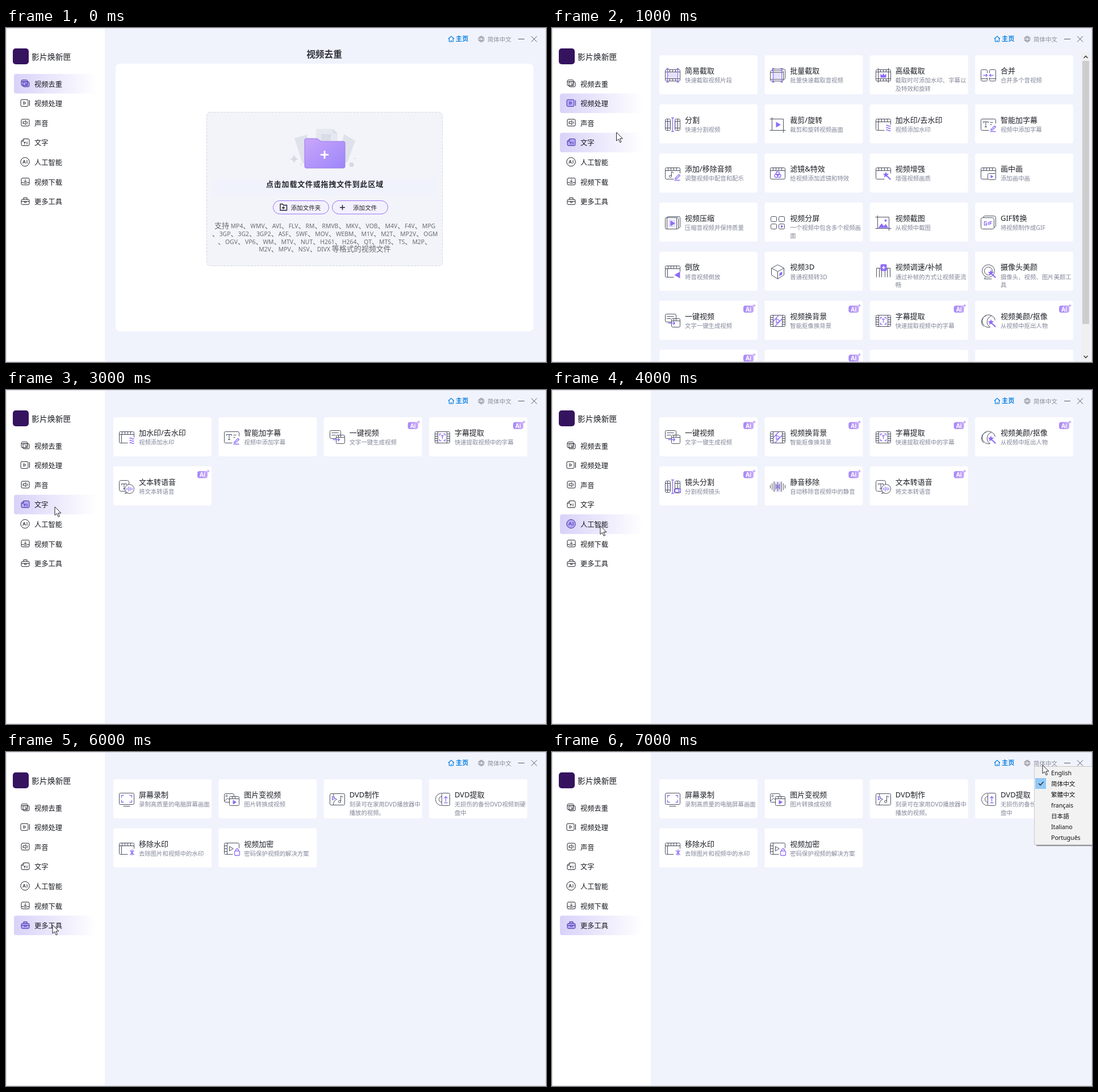
Write an HTML page that moves like this. It is 951 by 589 pixels and loops after 8 s.

```html
<!DOCTYPE html>
<html lang="zh-CN">
<head>
<meta charset="utf-8">
<style>
  html, body { margin: 0; width: 100%; height: 100%; overflow: hidden; background: #f0f3fc; }
  svg { display: block; width: 951px; height: 589px; font-family: 'Noto Sans', 'Noto Sans CJK SC', 'Noto Sans CJK', sans-serif; }
  .line, .sheet, .accent, .light { fill: none; stroke: #4b5060; stroke-linejoin: round; }
  .sheet { fill: #fff; }
  .accent { stroke: #8d6bf8; stroke-width: 1.3; }
  .light { stroke: #fff; stroke-width: 1.4; }
  .solid { fill: #8d6bf8; }
  .pale { fill: #e6e0fd; }
</style>
</head>
<body>
<svg id="stage" viewBox="0 0 951 589"></svg>
<script>
const PAGE_MS = 1000;

// Path helpers
const box = (x, y, w, h) => `M${x} ${y}h${w}v${h}h${-w}z`;
const round = (x, y, w, h, r = 2) =>
  `M${x + r} ${y}h${w - 2 * r}q${r} 0 ${r} ${r}v${h - 2 * r}q0 ${r} ${-r} ${r}h${2 * r - w}q${-r} 0 ${-r} ${-r}v${2 * r - h}q0 ${-r} ${r} ${-r}z`;
const ring = (x, y, r) => `M${x - r} ${y}a${r} ${r} 0 1 0 ${2 * r} 0a${r} ${r} 0 1 0 ${-2 * r} 0z`;
const play = (x, y, s) => `M${x} ${y - s}l${1.7 * s} ${s}l${-1.7 * s} ${s}z`;
const ticks = (list, draw) => list.map(draw).join('');
const star = (x, y, r) => 'M' + Array.from({ length: 10 }, (_, i) => {
  const angle = Math.PI * (i / 5 - 0.5), reach = i % 2 ? r * 0.45 : r;
  return `${(x + reach * Math.cos(angle)).toFixed(1)} ${(y + reach * Math.sin(angle)).toFixed(1)}`;
}).join('L') + 'z';

// Shared icon parts in a 28 x 28 box
const film = round(1, 4, 26, 20) + 'M1 8h26M1 20h26' + ticks([5, 9, 14, 19, 23], x => `M${x} 4v4M${x} 20v4`);
const sideFilm = round(1, 4, 26, 20) + 'M6 4v20M22 4v20' + ticks([8, 12, 16, 20], y => `M1 ${y}h5M22 ${y}h5`);
const strip = 'M1 9h26' + ticks([6, 11, 16, 21], x => `M${x} 4v5`);
const openFilm = 'M27 14V6q0-2-2-2H3q-2 0-2 2v16q0 2 2 2h13' + strip;
const closedFilm = round(1, 4, 26, 20) + strip;
const halves = round(1, 4, 9, 20) + round(18, 4, 9, 20) + 'M1 8h9M1 20h9M18 8h9M18 20h9M5 4v20M23 4v20';
const cropMarks = 'M4 1v23H0M0 4h24v24M28 24H4';
const divider = 'M14 2v24M11.5 2h5M11.5 26h5';
const pencil = 'M17 26h10M18 23l7-7 2 2-7 6z';
const wand = star(18.5, 16.5, 5.5) + 'M20.5 20l1.5-1.5 5.5 5.5-1.5 1.5z';
const letterT = 'M5 11v-2h9v2M9.5 9v9M7.5 18h4';

const icons = {
  crop: { pale: box(6, 8, 16, 12), line: film, accent: 'M5 2v24M23 2v24M3 2h4M21 2h4M3 26h4M21 26h4' },
  batch: { line: round(4, 3, 23, 18), sheet: round(1, 6, 23, 18) + 'M1 9h23M1 21h23', pale: box(6, 10, 13, 10), accent: 'M6 2v24M21 2v24M4 2h4M19 2h4M4 26h4M19 26h4' },
  crown: { line: film + 'M5 1v26M23 1v26', solid: 'M9 18v-7l3 3 2-4 2 4 3-3v7z' },
  merge: { line: 'M12 10V6q0-2-2-2H3q-2 0-2 2v16q0 2 2 2h7q2 0 2-2v-4M16 10V6q0-2 2-2h7q2 0 2 2v16q0 2-2 2h-7q-2 0-2-2v-4M1 20h11M16 20h11', accent: 'M5 14h7M9.5 11.5l2.5 2.5-2.5 2.5M23 14h-7M18.5 11.5l-2.5 2.5 2.5 2.5' },
  split: { pale: box(5, 8, 5, 12) + box(18, 8, 5, 12), line: halves, accent: divider },
  rotate: { line: cropMarks, solid: play(11, 14, 5) },
  watermark: { line: openFilm + 'M5 9v15', accent: ticks([16, 20, 24], y => `M19 ${y}q2-2 4 0t4 0`) },
  subtitle: { line: 'M27 12V6q0-2-2-2H3q-2 0-2 2v16q0 2 2 2h12' + letterT + 'M17 10h5M17 14h3', accent: pencil },
  audio: { line: openFilm + ring(10, 19, 2) + 'M12 19v-8l4 2', accent: pencil },
  filter: { line: closedFilm, accent: ring(14, 14, 3) + ring(11.5, 18, 3) + ring(16.5, 18, 3) },
  enhance: { line: openFilm, solid: wand },
  pip: { line: openFilm, sheet: round(13, 14, 14, 11), solid: play(18, 19.5, 3) },
  compress: { line: round(4, 3, 23, 20), sheet: round(1, 5, 23, 20) + 'M4 5v20M21 5v20', pale: box(6, 8, 13, 14), solid: play(10, 15, 5) },
  grid: { line: round(2, 3, 10, 9) + round(16, 3, 10, 9) + round(2, 16, 10, 9) + round(16, 16, 10, 9), solid: play(19.5, 20.5, 2.8) },
  shot: { line: cropMarks, solid: 'M5 23l6-8 4 5 3-4 5 7z' + ring(18, 10, 2) },
  gif: { line: round(5, 2, 22, 20, 3), sheet: round(1, 5, 23, 20, 3), accent: 'M11 12H7v6h4v-3h-2M14 12v6M20 12h-3.5v6M16.5 15h3' },
  reverse: { line: openFilm + 'M5 9v15', solid: 'M27 14v12l-10-6z' },
  cube: { line: 'M14 2l11 6v12l-11 7-11-7V8zM3 8l11 6 11-6M14 14v13', solid: 'M17 17l5-3v5l-5 3z' },
  speed: { line: 'M2 24V8h24v16M7 8v16M11 12v12M17 12v12M21 8v16', solid: round(9, 1, 11, 12), light: 'M14.5 4v6M11.5 7h6' },
  camera: { line: ring(14, 13, 11) + ring(14, 13, 7) + 'M9 23l-2 4h13', solid: wand },
  generate: { line: round(1, 2, 19, 14) + 'M4 6h12M4 10h7', sheet: round(12, 10, 15, 15) + 'M12 14h15M16 10v4M20 10v4', accent: 'M6 18h12M15 15l3 3-3 3' },
  background: { line: sideFilm, accent: 'M6 15L16 4M9 24l13-14' + play(11.5, 14, 4) },
  extract: { line: sideFilm, accent: 'M9 11V8h3M16 8h3v3M9 17v3h3M16 20h3v-3M11.5 11h5M14 11v6' },
  face: { line: 'M20 5A11 11 0 1 0 17 25A11 11 0 0 1 20 5M10 5A11 11 0 0 0 6 24M20 5q6 3 6 8', solid: wand },
  scene: { pale: box(5, 8, 5, 12), line: halves, sheet: round(17, 17, 11, 8), accent: divider + round(18, 18, 7, 6) + 'M25 20l3-2v6l-3-2' },
  mute: { pale: box(7, 5, 14, 18), line: ticks([3, 6, 9, 5, 8, 5, 9, 6, 3], (h, i) => `M${1 + 3.25 * i} ${14 - h}v${2 * h}`), accent: 'M11 11l6 6M17 11l-6 6' },
  speech: { line: round(1, 3, 17, 19, 3) + letterT, sheet: ring(19, 18, 8) + 'M13 23l-2 3 5-1', accent: 'M14.5 16v4M17.5 14v8M20.5 15v6M23.5 16v4' },
  shortVideo: { line: closedFilm, accent: 'M12 11v8M9 16l3 3 3-3M7 21.5h9', solid: ring(22, 19, 6) },
  download: { line: closedFilm, accent: 'M13 11v8M10 16l3 3 3-3M8 21.5h11' },
  screen: { line: round(1, 3, 26, 20) + 'M8 26h12', accent: 'M5 11V7h4M19 7h4v4M5 15v4h4M19 19h4v-4' },
  pictures: { line: round(1, 4, 17, 15) + ring(5, 8, 1.5) + 'M1 17l6-5 4 4', sheet: round(10, 9, 17, 16) + 'M10 13h17M15 9v4M20 9v4', solid: play(16, 19, 4) },
  dvdMake: { line: round(1, 4, 26, 20) + 'M7 4q0 8 6 10-6 2-6 10M20 18V8l4 2' + ring(18, 18, 2), accent: play(5, 12, 3) },
  dvdExtract: { line: 'M13 3A11 11 0 0 0 13 25M13 9a5 5 0 0 0 0 10' + round(13, 3, 14, 22), accent: 'M20 18v-9M17 12l3-3 3 3M17 20h6' },
  unmark: { line: openFilm + 'M5 9v15', accent: 'M20 17l7 8M27 17l-7 8M23.5 15v11' },
  encrypt: { line: 'M27 13V6q0-2-2-2H3q-2 0-2 2v16q0 2 2 2h13M6 4v20M1 9h5M1 14h5M1 19h5' + play(10, 14, 4), accent: round(19, 18, 9, 8) + 'M21 18v-2q2.5-4 5 0v2' },
};

// key: [title, description, has Ai badge]
const tools = {
  crop: ['简易截取', '快速截取视频片段'],
  batch: ['批量截取', '批量快速截取音视频'],
  crown: ['高级截取', '截取时可添加水印、字幕以\n及特效和旋转'],
  merge: ['合并', '合并多个音视频'],
  split: ['分割', '快速分割视频'],
  rotate: ['裁剪/旋转', '裁剪和旋转视频画面'],
  watermark: ['加水印/去水印', '视频添加水印'],
  subtitle: ['智能加字幕', '视频中添加字幕'],
  audio: ['添加/移除音频', '调整视频中配音和配乐'],
  filter: ['滤镜&amp;特效', '给视频添加滤镜和特效'],
  enhance: ['视频增强', '增强视频画质'],
  pip: ['画中画', '添加画中画'],
  compress: ['视频压缩', '压缩音视频并保持质量'],
  grid: ['视频分屏', '一个视频中包含多个视频画\n面'],
  shot: ['视频截图', '从视频中截图'],
  gif: ['GIF转换', '将视频制作成GIF'],
  reverse: ['倒放', '将音视频倒放'],
  cube: ['视频3D', '普通视频转3D'],
  speed: ['视频调速/补帧', '通过补帧的方式让视频更流\n畅'],
  camera: ['摄像头美颜', '摄像头、视频、图片美颜工\n具'],
  generate: ['一键视频', '文字一键生成视频', true],
  background: ['视频换背景', '智能抠像换背景', true],
  extract: ['字幕提取', '快速提取视频中的字幕', true],
  face: ['视频美颜/抠像', '从视频中抠出人物', true],
  scene: ['镜头分割', '分割视频镜头', true],
  mute: ['静音移除', '自动移除音视频中的静音', true],
  speech: ['文本转语音', '将文本转语音', true],
  shortVideo: ['萤片视频下载', '下载萤片中的视频'],
  download: ['Wavodix下载', 'Wavodix视频下载工具'],
  screen: ['屏幕录制', '录制高质量的电脑屏幕画面'],
  pictures: ['图片变视频', '图片转换成视频'],
  dvdMake: ['DVD制作', '刻录可在家用DVD播放器中\n播放的视频。'],
  dvdExtract: ['DVD提取', '无损伤的备份DVD视频到硬\n盘中'],
  unmark: ['移除水印', '去除图片和视频中的水印'],
  encrypt: ['视频加密', '密码保护视频的解决方案'],
};

const menu = [
  ['视频去重', round(1, 2, 11, 10) + round(4, 5, 11, 9) + 'M1 5h11M7 7l5 5M12 7l-5 5'],
  ['视频处理', round(0, 2, 13, 12) + 'M15.5 3v10M5 5.5l4 2.5-4 2.5z'],
  ['声音', round(1, 2, 14, 12) + 'M4 6.5h2l3-2v7l-3-2H4zM11 6q2 2 0 4'],
  ['文字', 'M5 2h8q2 0 2 2v8q0 2-2 2H3q-2 0-2-2V6zM5 2v4H1M5 8h4M7 8v4M11 7v5'],
  ['人工智能', ring(7.5, 8, 7.7) + 'M3.5 11l2.5-6 2.5 6M4.5 9h3M11 5v6'],
  ['视频下载', round(1, 2, 14, 12) + 'M8 4v5M5.5 7l2.5 2.5 2.5-2.5M1 10h3q4 3 8 0h3'],
  ['更多工具', round(1, 5, 14, 9) + 'M5 5V2h6v3M1 8.5h14M6.5 8.5v2h3v-2'],
];

const moreTools = ['screen', 'pictures', 'dvdMake', 'dvdExtract', 'unmark', 'encrypt'];
const pages = [
  { active: [0] },
  { active: [1, 3], cursor: [113.5, 184], scroll: true, tools: [...Object.keys(tools).slice(0, 26), 'screen', 'pictures'] },
  { active: [2], cursor: [86.5, 175.5], tools: ['batch', 'merge', 'compress', 'reverse', 'mute', 'speech'] },
  { active: [3], cursor: [86, 206], tools: ['watermark', 'subtitle', 'generate', 'extract', 'speech'] },
  { active: [4], cursor: [85, 239.5], tools: ['generate', 'background', 'extract', 'face', 'scene', 'mute', 'speech'] },
  { active: [5], cursor: [83, 271], tools: ['shortVideo', 'download'] },
  { active: [6], cursor: [82, 305], tools: moreTools },
  { active: [6], cursor: [864, 23], languages: true, tools: moreTools },
];

// Drawing helpers; text is placed by its vertical centre
const rect = (x, y, w, h, fill, r = 0, extra = '') =>
  `<rect x="${x}" y="${y}" width="${w}" height="${h}" rx="${r}" fill="${fill}" ${extra}/>`;
const path = (d, fill, stroke = 'none', extra = '') => `<path d="${d}" fill="${fill}" stroke="${stroke}" ${extra}/>`;
const text = (x, y, size, fill, value, extra = '') =>
  `<text x="${x}" y="${y + size * 0.38}" font-size="${size}" fill="${fill}" ${extra}>${value}</text>`;
const at = (x, y, content) => `<g transform="translate(${x} ${y})">${content}</g>`;

function badge(x, y) {
  return path(round(x, y + 1.5, 18, 12.5, 4), 'url(#badge)') +
    text(x + 4, y + 8, 10, '#fff', 'Ai', 'font-weight="700"') +
    path(`M${x + 19} ${y - 1}v5M${x + 16.5} ${y + 1.5}h5`, 'none', '#a88af6');
}

function card(key, i) {
  const x = 189 + 185.33 * (i % 4), y = 48 + 86.6 * Math.floor(i / 4);
  const [title, note, ai] = tools[key];
  const art = Object.entries(icons[key]).map(([kind, d]) => `<path class="${kind}" d="${d}"/>`).join('');
  const notes = note.split('\n').map((line, n) => text(x + 45, y + 44.3 + 14.3 * n, 10.4, '#83879a', line)).join('');
  return rect(x, y, 173, 69, '#fff', 4) + at(Math.round(x) + 9.5, Math.round(y) + 21.5, art) +
    text(x + 45, y + 27, 13, '#1d1f26', title) + notes + (ai ? badge(x + 148, y + 7) : '');
}

function sidebar(active) {
  const rows = menu.map(([label, d], i) => {
    const y = 98.2 + 34.6 * i, on = active.includes(i);
    return (on ? rect(14, y - 17.3, 146, 34.6, 'url(#row)', 4) : '') +
      at(26, y - 8.5, path(d, on ? '#b5a7fa' : 'none', on ? '#40309a' : '#20222a')) +
      text(50, y + 0.7, 12.25, '#16181e', label);
  });
  return rect(0, 0, 174, 589, '#fff') + rect(12, 36, 28, 28, '#35135f', 5) +
    text(45, 50.3, 13.9, '#16181e', '影片焕新匣') + rows.join('');
}

function topBar() {
  const blue = '#087fe0', grey = '#8b8e96';
  return path('M779 19l5-4.5 5 4.5M780.5 18v6h7v-6M784 24v-3', 'none', blue, 'stroke-width="1.2"') +
    text(792, 19.2, 11.2, blue, '主页', 'font-weight="700"') +
    path(ring(837, 19.5, 5) + 'M832 17.5h10M832 21.5h10M837 14.5q-5 5 0 10q5-5 0-10', 'none', grey) +
    text(848, 20, 10.5, grey, '简体中文') +
    path('M902 19.5h11M925 14.5l10 10M935 14.5l-10 10', 'none', '#555861');
}

const formats = [
  '支持 MP4、WMV、AVI、FLV、RM、RMVB、MKV、VOB、M4V、F4V、MPG',
  '、3GP、3G2、3GP2、ASF、SWF、MOV、WEBM、M1V、M2T、MP2V、OGM',
  '、OGV、VP6、WM、MTV、NUT、H261、H264、QT、MTS、TS、M2P、',
  'M2V、MPV、NSV、DIVX 等格式的视频文件',
];

function pill(x, label, labelX, sign) {
  return rect(x, 304.5, 98, 23.5, '#f4f1fe', 11.75, 'stroke="#9673f4"') +
    path(sign, 'none', '#20222a', 'stroke-width="1.4"') + text(labelX, 317, 10.6, '#20222a', label);
}

function dropZone() {
  const middle = 'text-anchor="middle"';
  const list = formats.map((line, i) =>
    text(561.5, 349 + 13.8 * i, 10.4, '#666a73', line.replace(/[^\x00-\x7f]+/g, '<tspan font-size="13">$&</tspan>'), middle));
  return text(560.5, 46.5, 15.7, '#303238', '视频去重', middle + ' font-weight="700"') +
    rect(193, 63, 736, 472, '#fff', 8) +
    rect(353.5, 148.5, 415, 271, '#f3f4f9', 6, 'stroke="#d3d7e2" stroke-dasharray="4 2"') +
    rect(364, 266, 394, 29, '#f0f3fb') +
    path('M508 194l22-6 8 50-16 1zM595 187l20 12-14 38-16-2z', '#dfe2ea') +
    path('M546 180q0-2 2-2h28l8 8v30h-38z', '#e6e8f0') + path('M576 178v8h8M555 187h17v12h-17z', '#d9dde7') +
    path('M507.5 223q1 7 8 8q-7 1-8 8q-1-7-8-8q7-1 8-8z' + ring(608.5, 241, 4) + ring(519, 240.5, 1.2) + ring(614.5, 230, 1.2), '#d6d9e3') +
    path('M526 198q0-3 3-3h19l7 5h39q3 0 3 3v41q0 3-3 3h-65q-3 0-3-3z', 'url(#folder)', '#9a78ee') +
    path('M561 216.5v14M554 223.5h14', 'none', '#fff', 'stroke-width="3"') +
    text(561.5, 275, 13, '#24262d', '点击加载文件或拖拽文件到此区域', middle + ' font-weight="700" letter-spacing=".8"') +
    pill(470.5, '添加文件夹', 501.5, 'M483 310.5h4l2 2h5.5v9h-11.5zM488.5 314.5v5M486 317h5') +
    pill(574.5, '添加文件', 611, 'M592.5 312v9M588 316.5h9') + list.join('');
}

function scrollBar() {
  return rect(932, 43, 15, 545, '#f0f0f1') + rect(934, 58, 12, 464, '#cdcdcd') +
    path('M936.5 53l3.5-3.5 3.5 3.5M936.5 578l3.5 3.5 3.5-3.5', 'none', '#454545', 'stroke-width="1.6"');
}

function languageMenu() {
  const names = ['English', '简体中文', '繁體中文', 'français', '日本語', 'Italiano', 'Português'];
  return rect(853, 29, 98, 137, '#9698a0') + rect(849.5, 25.5, 103, 138, '#f2f2f2', 0, 'stroke="#c8c8ca"') +
    rect(851, 46, 19, 19, '#91c9f7') + path('M857 55.5l3 3 5.5-6', 'none', '#1d2530', 'stroke-width="1.3"') +
    names.map((name, i) => text(879, 37 + 19 * i, 10.6, '#111', name)).join('');
}

const gradient = (id, from, to, end) =>
  `<linearGradient id="${id}" x2="1" y2="${end}"><stop stop-color="${from}"/><stop offset="1" stop-color="${to}"/></linearGradient>`;
const defs = `<defs>${gradient('row', '#d9d2f9', '#fff', 0)}${gradient('badge', '#a588f7', '#c9a8fb', 0)}${gradient('folder', '#caa6fb', '#9c86f9', 1)}</defs>`;
const arrow = path('M0 0v15l3.5-3.2 2.7 6 2.3-1-2.6-5.8h5z', '#fff', '#22242c');

const scenes = pages.map(page =>
  defs + rect(0, 0, 951, 589, '#f0f3fc') + sidebar(page.active) + topBar() +
  (page.tools ? page.tools.map(card).join('') : dropZone()) +
  (page.scroll ? scrollBar() : '') +
  rect(0.5, 0.5, 950, 588, 'none', 0, 'stroke="#d6d8e8"') +
  (page.languages ? languageMenu() : '') +
  (page.cursor ? at(...page.cursor, arrow) : ''));

const stage = document.getElementById('stage');
let shown = -1;

function draw() {
  const index = Math.floor(performance.now() / PAGE_MS) % scenes.length;
  if (index !== shown) stage.innerHTML = scenes[shown = index];
  requestAnimationFrame(draw);
}
draw();
</script>
</body>
</html>
```
